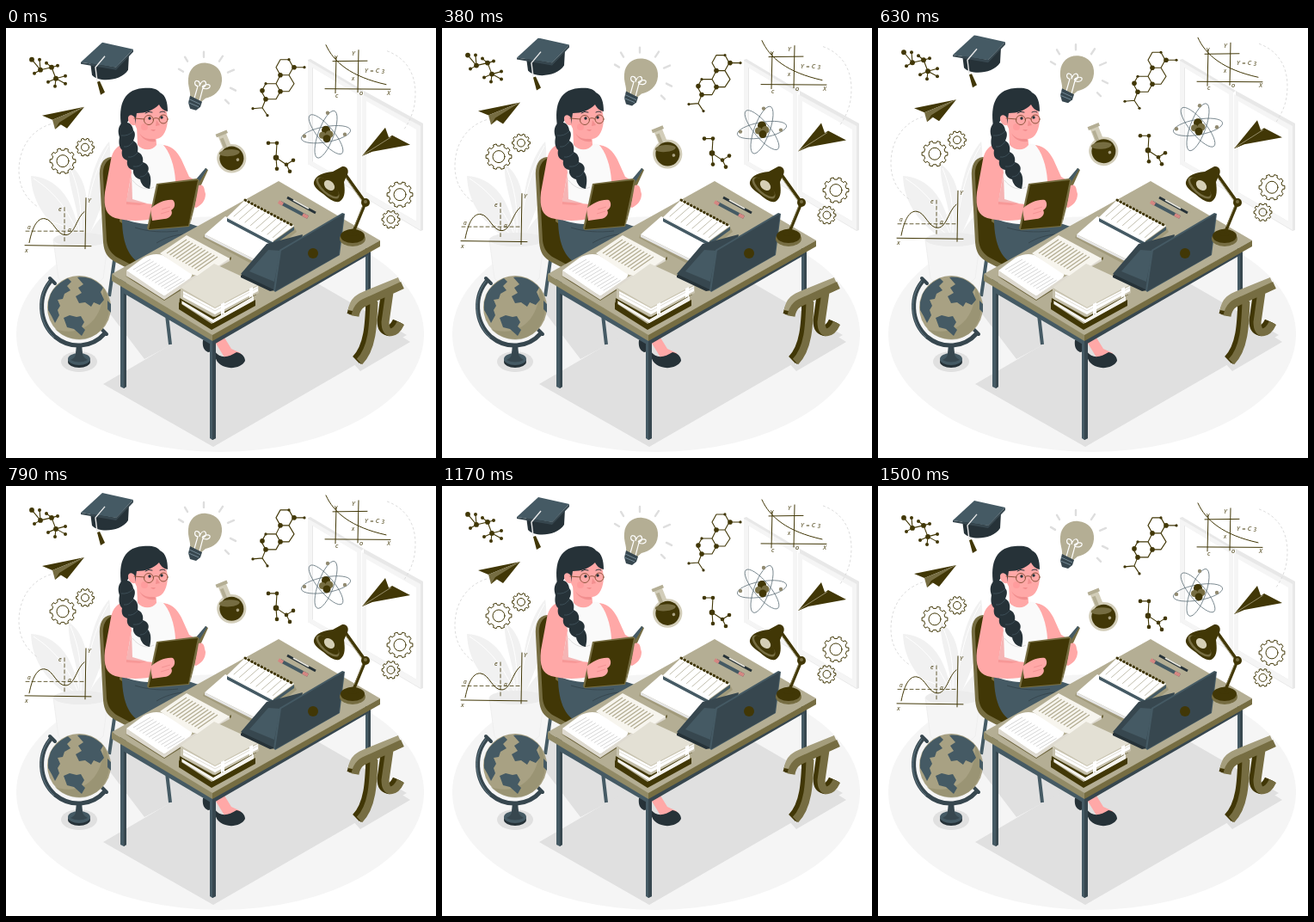
Animation of 500x500 px, one loop 1540 ms. Source, as an HTML page:

```html
<!DOCTYPE html>
<html lang="en">
<head>
<meta charset="utf-8">
<title>Studying at the desk</title>
<style>
html, body { margin: 0; width: 100%; height: 100%; overflow: hidden; background: #fff; }
svg { display: block; width: 100vw; height: 100vh; }
.float { animation: float 1540ms linear infinite; }
@keyframes float {
  0%, 100% { transform: translateY(-.3px); }
  47.1% { transform: translateY(-10px); }
  95.8% { transform: translateY(0); }
}
.ink { fill: none; stroke: #413706; stroke-linecap: round; stroke-linejoin: round; }
.dark { fill: #413706; }
.mid { fill: #766d42; }
.tan { fill: #b4ae94; }
.slate { fill: #455a64; }
.navy { fill: #37474f; }
.night { fill: #263238; }
.skin { fill: #ffa8a7; }
.blush { fill: #f28f8f; }
.pale { fill: #f5f5f5; }
.shade { fill: #e0e0e0; }
.white { fill: #fff; }
.dash { fill: none; stroke: #dcdcdc; stroke-dasharray: 3 2.5; }
text { font: italic 7.5px "Open Sans", Inter, sans-serif; fill: #413706; }
.small { font-size: 6.5px; }
</style>
</head>
<body>
<svg viewBox="0 0 500 500">
  <defs>
    <path id="pi-shape" d="M406 334C408 322 414 319 424 315L461 298M428 317C427 345 426 372 411 387M446 306L441 341C441 358 453 355 459 342"/>
  </defs>

  <ellipse class="pale" cx="249" cy="356" rx="237" ry="137"/>

  <g id="window">
    <path fill="#e8e8e8" fill-rule="evenodd" d="M351 37l3-1 62 37v120l-3 1-62-36zm6 9v110l54 31V78zM413 75l3-2 69 38v124l-3 1-69-41zm6 9v107l60 35V115z"/>
    <path fill="#f5f5f5" fill-rule="evenodd" d="M351 38l62 36v119l-62-35zm5 8v109l52 30V77zM414 77l68 37v121l-68-40zm5 8v106l58 34V118z"/>
  </g>

  <g id="plant">
    <path fill="#f1f1f1" d="M82 250C50 230 30 205 29 172c28 2 48 22 56 66 0-30-14-55-12-80 21 16 24 43 19 72 2-37 8-75 28-98 5 30-4 70-25 112 10-22 28-40 48-39-5 30-22 49-51 57z"/>
    <path fill="none" stroke="#fff" d="M32 175c25 16 40 36 53 67M75 163c10 24 13 45 12 75M119 137c-17 30-25 64-28 103M50 225c16 3 25 9 34 20"/>
    <path fill="#f5f5f5" stroke="#efefef" d="M55 246c18 10 46 10 64 0l-6 45c-10 12-42 12-52 0z"/>
    <ellipse cx="87" cy="246" rx="32" ry="8" fill="#ececec"/>
  </g>

  <g id="shadows" class="shade">
    <path d="M113 414l128 73 225-130-128-74z"/>
    <path d="M120 331v-36h70l50 48-51 27-28 15z"/>
    <path d="M402 388l46-37 22 14-58 34z"/>
    <ellipse cx="85" cy="388" rx="21" ry="12"/>
  </g>

  <g id="chair">
    <path fill="none" stroke="#455a64" stroke-width="4" d="M126 270l-6 42M186 325l5 43"/>
    <path class="mid" d="M122 150c-10 1-14 10-13 24l4 75c1 12 5 18 14 23l25 13 8-6-14-120z"/>
    <path class="dark" d="M124 151c-8 3-12 10-11 22l4 74c1 10 6 16 13 20l30 16 32-18-60-40 2-70z"/>
  </g>

  <g id="woman">
    <path class="skin" d="M240 360h14l8 13 11 5-4 8-15-3z"/>
    <path class="night" d="M229 363l10-1 5 13-9 2c-5-2-7-7-6-14zM243 376c6 9 16 7 25 1 6 1 10 5 10 10-3 7-15 10-23 7-8-2-13-9-12-18z"/>
    <path class="slate" d="M135 216l35 6 45 6 30 10-60 40-27-3c-15-7-24-25-23-59z"/>
    <path fill="none" stroke="#37474f" d="M150 232c16 5 32 6 50 4M175 250c10-6 20-9 31-10"/>
    <path class="skin" d="M180 136c12 0 19 7 24 17l9 20c9 5 18 13 19 20 0 8-5 13-11 16l-23-7-20-36z"/>
    <path fill="#fafafa" d="M139 136l14-3 29 2c8 8 14 25 15 42l-7 48c-14 5-37 4-52-3l-4-47z"/>
    <path fill="none" stroke="#dedede" d="M147 177c8 10 17 12 25 8M138 199c2 8 3 16 2 23"/>
    <path class="skin" d="M152 113l22 8 1 15c-5 7-16 7-22 0z"/>
    <path class="blush" d="M155 122c5 7 11 8 18 6l1 4c-9 1-16-3-19-10z"/>
    <path class="skin" d="M149 86l36 2 3 17c0 13-5 23-13 24-14 1-25-9-27-24z"/>
    <path class="night" d="M135 119c-5-25-1-47 24-49 9-1 17 0 20 5 7 3 9 12 9 22-5-1-8-4-10-8-7 7-16 10-26 10l-2 13-4-10z"/>
    <path class="skin" d="M142 105c0-5 6-5 8 0v8c-4 1-8-3-8-8z"/>
    <g class="ink" stroke-width="1">
      <circle cx="166" cy="107" r="5.5" stroke="#8c553e"/>
      <circle cx="183" cy="106" r="5" stroke="#8c553e"/>
      <path stroke="#8c553e" d="M171 106q3-3 7 0M161 106l-12-1"/>
      <path stroke="#263238" d="M162 99q4-3 8-1M179 98q4-2 6 0"/>
    </g>
    <path class="blush" d="M175 107l4 6-5 1zM168 118q4 4 6 0z"/>
    <circle class="night" cx="167" cy="105" r="1.7"/>
    <circle class="night" cx="181" cy="104" r="1.7"/>
    <circle cx="161" cy="115" r="4" fill="#ff8f92" opacity=".45"/>
    <path class="skin" d="M140 135c-10 0-16 7-18 18l-7 38c-2 18 2 27 12 30 15 4 32 4 47 0l17-4c7-3 9-9 6-16-8-3-17 1-25 4l-32-3 6-34z"/>
    <path class="blush" d="M140 201l6-31 1 29 17 5-9 2-15-1z" opacity=".65"/>
    <g class="night">
      <path d="M134 111c7-3 13 0 14 8 3 3 2 8 0 12 5 3 6 8 5 13 5 2 7 7 6 12 6 2 8 6 6 11 4 4 4 12 2 20-6-1-10-5-11-11-5-1-9-6-8-11-6-1-8-6-7-11-6-2-7-7-6-12-4-4-4-10-3-15-2-6-2-11 2-16z"/>
      <path fill="none" stroke="#455a64" stroke-width=".7" d="M134 125q8 1 14-5M137 138q6 1 11-6M142 150q6 1 11-5M148 161q7 1 11-4M156 173q6 0 9-6"/>
    </g>
    <path class="mid" d="M221 178l11-15 3 2-11 24-10 40z"/>
    <path class="slate" d="M220 177l12-14 2 1-11 18z"/>
    <path class="mid" d="M175 181l47-6 3 2-12 54-47 4-2-2z"/>
    <path class="dark" d="M177 182l46-5-11 53-46 4z"/>
    <path class="skin" d="M168 210c8-7 18-11 26-10 4 4 2 10-2 12 3 4-2 10-8 10l-14 2zM224 183c5-2 7 2 7 8l-3 10-8 5z"/>
    <path fill="none" stroke="#ef8f90" stroke-width=".8" d="M181 211l10-3M180 216l10-3"/>
  </g>

  <g id="desk">
    <path class="slate" d="M133 290h7v127l-3 2-4-2zM418 256h6v116l-3 2-3-2zM237 360h7v117l-4 2-3-2z"/>
    <path class="navy" d="M137 290h3v127l-3 2zM421 256h3v116l-3 2zM240 360h4v117l-4 2z"/>
    <path class="slate" d="M136 298l104 62v9l-104-61z"/>
    <path class="navy" d="M240 360l183-105v8l-183 106z"/>
    <path class="tan" d="M123 286l194-108 118 69-195 111z"/>
    <path fill="#918a66" d="M123 286l117 71v7l-117-70z"/>
    <path class="mid" d="M240 357l195-110v7l-195 110z"/>
  </g>

  <g id="papers">
    <path fill="#8f8865" opacity=".5" d="M229 244l60 32 49-39-3-6-47 35-56-28z"/>
    <path fill="#e5e5e5" d="M231 240l58 29 28-18v3l-28 18-58-29z"/>
    <path class="white" d="M231 240l24-21 62 32-28 18z"/>
    <path class="slate" d="M257 221l53 28 25-18v4l-25 18-53-28z"/>
    <path class="white" d="M257 220l22-21 56 31-25 18z"/>
    <path class="ink" id="notes" stroke-width=".6" opacity=".55"/>
    <path class="ink" stroke-width="3" stroke-dasharray=".8 3.5" stroke-linecap="butt" d="M278 200l56 30"/>
    <path fill="none" stroke="#263238" stroke-width="3" d="M327 197l33 18"/>
    <path fill="none" stroke="#e8e6dc" stroke-width="2" d="M334 200l18 10"/>
    <path fill="none" stroke="#455a64" stroke-width="4" d="M319 203l32 17"/>
    <path fill="none" stroke="#d58782" stroke-width="4" d="M317 202l5 3M345 217l6 3"/>
  </g>

  <g id="open-book">
    <path class="dark" d="M138 288l46 29 24-15 54-33v-3l-49 25-29 20z" opacity=".6"/>
    <path fill="#dedad0" d="M140 282l44 30 29-21 47-24v4l-47 26-29 19-44-28z"/>
    <path class="white" d="M140 282l20-15c8-4 15-5 22-3l32 19c3 2 3 5 0 8l-30 21z"/>
    <path fill="#f7f5ee" d="M179 262l31-21 50 27-27 18c-8 4-15 2-21-2z"/>
    <path id="left-page" fill="none" stroke="#c4c4c4" stroke-width=".7"/>
    <path id="right-page" fill="none" stroke="#b4ae94" stroke-width="1.4"/>
  </g>

  <g id="stack">
    <path class="dark" d="M201 319l38 25 51-28v7l-51 28-38-24z"/>
    <path fill="#f5f4ef" d="M205 315l36 22 47-26v6l-47 26-36-22z"/>
    <path class="dark" d="M202 314l39 22 50-29v3l-50 29-37-22v7l-3 2z"/>
    <path fill="#c7c2ae" d="M203 302l40 22 51-27v11l-51 28-40-22z"/>
    <path class="white" d="M206 306l37 20 50-26v6l-50 27-37-20z"/>
    <path fill="none" stroke="#d4d1c5" stroke-width=".7" d="M206 309l37 20 50-27"/>
    <path fill="#e3e0d4" d="M203 302l39-28 52 24-51 27z"/>
    <path class="white" d="M250 321l4-2v14l-2-1-2 3zM283 303l4-2v12l-2-1-2 2z"/>
  </g>

  <g id="laptop">
    <path class="night" d="M273 288l30-36 42-11-32 64-6 1-34-16z"/>
    <path class="navy" d="M273 286l30-35 42-11-34 64z"/>
    <path class="slate" d="M283 283l22-25 14 1-7 36z"/>
    <path class="slate" d="M318 258l73-43 3 1-6 48-75 43-2-2z"/>
    <path class="navy" d="M320 259l73-43-6 48-74 42z"/>
    <circle class="dark" cx="357" cy="262" r="6"/>
  </g>

  <g id="lamp">
    <ellipse class="mid" cx="403" cy="245" rx="15" ry="9"/>
    <ellipse class="dark" cx="403" cy="242" rx="14" ry="8"/>
    <path class="dark" d="M396 240v-4q7-5 14 0v4q-7 4-14 0z"/>
    <path class="ink" stroke-width="3.5" d="M404 237l14-34-25-35"/>
    <path fill="none" stroke="#8f8865" stroke-width=".8" d="M405 231l11-27-22-31"/>
    <circle class="dark" cx="418" cy="203" r="5"/>
    <circle class="mid" cx="418" cy="202" r="2"/>
    <path class="dark" d="M358 179c2-8 11-11 22-12l11-6c6-1 8 5 6 9l-4 9c1 9 2 17-4 22-5 4-13-2-20-8-7-5-12-9-11-14z"/>
    <ellipse class="mid" cx="374" cy="186" rx="17" ry="7" transform="rotate(42 374 186)"/>
    <ellipse class="dark" cx="375" cy="185" rx="15" ry="6" transform="rotate(42 375 185)"/>
    <ellipse fill="#d5cfb6" cx="376" cy="183" rx="7" ry="5" transform="rotate(42 376 183)"/>
  </g>

  <g id="globe">
    <ellipse class="night" cx="85" cy="388" rx="13" ry="7"/>
    <ellipse class="slate" cx="85" cy="385" rx="13" ry="7"/>
    <path class="navy" d="M82 368h6l1 10c0 4 3 6 6 8q-10 5-20 0c4-2 6-4 6-8z"/>
    <path fill="none" stroke="#37474f" stroke-width="5" d="M54 292C36 311 38 342 57 359c18 15 43 13 58-4"/>
    <path fill="none" stroke="#607985" stroke-width="1" d="M53 292C35 311 37 342 56 360"/>
    <path fill="none" stroke="#37474f" stroke-width="4" stroke-linecap="round" d="M51 291l6 6M111 350l6 6"/>
    <circle cx="85" cy="325" r="37" fill="#a8a183"/>
    <path fill="#918a69" d="M113 301c15 25 5 54-21 61-15 2-28-4-35-12 32 11 58-12 56-49z" opacity=".55"/>
    <g class="slate">
      <path d="M52 309c5-9 12-14 20-18l4 4-5 5 4 5-7 4-2 6-6 1 3 7-3 5 2 6-5 9-4-8-4-7v-9z"/>
      <path d="M83 290c12-2 23 4 30 12l-3 5 4 9-5 6-7-3-3 5-7-5-7 1-4-8 7-4-4-6 6-4z"/>
      <path d="M67 337l7-3 8 2 5-1 4 7-3 5 4 4-4 7-9-8-8-2z"/>
      <path d="M118 317l4 4v10l-4-4z"/>
    </g>
  </g>

  <g id="pi" fill="none" stroke-width="11" stroke-linejoin="round">
    <use href="#pi-shape" stroke="#413706" transform="translate(-4 -1)"/>
    <use href="#pi-shape" stroke="#413706" transform="translate(-2 0)"/>
    <path stroke="#a49d7c" d="M403 329C405 317 411 314 421 310L458 295"/>
    <use href="#pi-shape" stroke="#766d42" stroke-width="9" transform="translate(0 1)"/>
  </g>

  <g class="float">
    <path class="dash" d="M52 112C27 120 15 142 15 166c0 19 8 33 23 43"/>
    <path class="dash" d="M443 27c22 8 33 26 33 49 0 18-5 30-13 42"/>

    <g id="molecules" class="ink" stroke-width="1.1"></g>

    <g id="cap">
      <path class="night" d="M98 40l2 15c8 9 34 7 42-6l1-18-15 15z"/>
      <path class="slate" d="M112 17l36 8-20 21-41-6z"/>
      <path class="navy" d="M87 40l41 6 20-21v3l-20 21-41-7z"/>
      <path fill="none" stroke="#e8e8e8" stroke-width="1.4" d="M115 33l-11 13 2 16"/>
      <path class="dark" d="M106 63l3-1 6 13-5 3z"/>
    </g>

    <g id="bulb">
      <path fill="none" stroke="#dedede" stroke-width="2.4" stroke-linecap="round" d="M208 34l3 5M230 28v6M252 33l-4 6M265 49l-7 3M267 73l-6-3M259 88l-4-4M201 48l5 3"/>
      <path class="tan" d="M212 59c1-12 10-19 21-18 12 1 19 10 18 21-1 12-10 18-19 20l-6 5-12-6c1-8-3-13-2-22z"/>
      <path fill="none" stroke="#fff" stroke-width="1.2" d="M219 82l4-14c-5-1-4-8 0-6 3 1 2 6 2 6s2-7 6-6c3 2 1 7-2 7s5-5 8-2c1 4-5 5-8 3l-4 15"/>
      <path class="navy" d="M214 79l14 7-2 6-5 4-7-2-2-7z"/>
      <path fill="none" stroke="#738995" d="M213 83l13 6M212 87l12 5"/>
    </g>

    <g id="flask" transform="rotate(-22 262 151)">
      <path fill="#d2cdb9" d="M257 121h10v15c8 3 12 8 12 16a17 17 0 0 1-34 0c0-8 4-13 12-16z"/>
      <path class="tan" d="M255 119h14v4h-14zM258 126h4v15h-4z"/>
      <circle class="dark" cx="262" cy="152" r="14"/>
      <ellipse class="mid" cx="262" cy="145" rx="12" ry="4" transform="rotate(18 262 145)"/>
      <circle cx="268" cy="156" r="1.8" fill="#aaa283"/>
    </g>

    <g id="atom" fill="none" stroke="#66777f" stroke-width=".8">
      <ellipse cx="372" cy="124" rx="29" ry="9" transform="rotate(-10 372 124)"/>
      <ellipse cx="372" cy="124" rx="29" ry="9" transform="rotate(50 372 124)"/>
      <ellipse cx="372" cy="124" rx="29" ry="9" transform="rotate(110 372 124)"/>
      <g stroke="none">
        <circle class="dark" cx="372" cy="119" r="5"/>
        <circle class="mid" cx="368" cy="125" r="4"/>
        <circle class="mid" cx="376" cy="124" r="4.5"/>
        <circle class="dark" cx="373" cy="129" r="4.5"/>
        <circle fill="#918a70" cx="374" cy="99" r="2.2"/>
        <circle fill="#918a70" cx="394" cy="124" r="2.2"/>
        <circle fill="#918a70" cx="347" cy="126" r="2.2"/>
      </g>
    </g>

    <g id="planes">
      <path class="dark" d="M42 102l49-10-37 15z"/>
      <path class="mid" d="M54 107l37-15-34 26z"/>
      <path class="dark" d="M57 118l5-8 29-18-20 25-8-5z"/>
      <path class="dark" d="M414 149l27-33 5 14z"/>
      <path class="mid" d="M414 149l32-19 4 6-23 7z"/>
      <path class="dark" d="M414 149l35-24 21 11-44 8z"/>
      <path fill="none" stroke="#aaa283" stroke-width=".8" d="M415 148l33-21"/>
    </g>

    <g id="gears" class="ink" stroke-width="1"></g>

    <g id="curve" class="ink" stroke-width="1">
      <path d="M372 20c9 20 29 37 70 46M371 71l76 .5M410 26l-1 49M384 34l-1 42M380 39l40-.5"/>
    </g>
    <text x="402" y="32">Y</text>
    <text x="382" y="36">v</text>
    <text class="small" x="402" y="61">x</text>
    <text x="417" y="52" textLength="23">Y=C<tspan class="small" dy="1">3</tspan></text>
    <text x="383" y="81">c</text>
    <text x="411" y="78">o</text>
    <text x="443" y="78">X</text>

    <g id="wave" class="ink" stroke-width="1">
      <path d="M27 250c4-20 10-29 18-28 10 1 14 20 25 19 10-1 12-20 21-27M22 253l77 1M93 198l-1 59"/>
      <path stroke-width=".8" stroke-dasharray="4 3" d="M23 236.500h69M68 209v41"/>
    </g>
    <text x="95" y="203">Y</text>
    <text x="61" y="213">e</text>
    <text class="small" x="25" y="234">a</text>
    <text class="small" x="72" y="237">a</text>
    <text x="22" y="261">x</text>
  </g>
</svg>
<script>
const byId = id => document.getElementById(id);

// Draws n parallel strokes, each offset by (dx, dy) from the last.
function rule(id, x, y, w, h, dx, dy, n) {
  let d = "";
  for (let i = 0; i < n; i++) d += `M${x + i * dx} ${y + i * dy}l${w} ${h}`;
  byId(id).setAttribute("d", d);
}
rule("notes", 265, 219, 16, -14, 6.500, 3.500, 8);
rule("left-page", 148, 281, 20, -12, 3.6, 2.2, 12);
rule("right-page", 187, 262, 23, -16, 3.6, 2, 11);

function gear(x, y, r, hole, teeth = 10) {
  const step = 2 * Math.PI / teeth, pts = [];
  for (let i = 0; i < teeth; i++) {
    for (const [k, size] of [[-.27, .84], [-.2, 1], [.2, 1], [.27, .84]]) {
      const a = (i + k) * step;
      pts.push((x + size * r * Math.cos(a)).toFixed(1) + "," + (y + size * r * Math.sin(a)).toFixed(1));
    }
  }
  return `<polygon points="${pts.join(" ")}"/><circle cx="${x}" cy="${y}" r="${hole}"/>`;
}
byId("gears").innerHTML = gear(66, 155, 15, 7) + gear(92, 139, 10.5, 4.5)
  + gear(458, 194, 15, 7) + gear(447.500, 223, 10.5, 4.5);

const dots = (r, ...pts) => pts.map(([x, y]) =>
  `<circle class="dark" style="stroke:none" cx="${x}" cy="${y}" r="${r}"/>`).join("");
const bonds = d => `<path d="${d}"/>`;
byId("molecules").innerHTML =
  bonds("M30 37l10 12 13-3 5 13 11-3M39 37l1 12-7 4M47 41l6 5 7-2M49 63l9-4-1 9M58 59l11 6") +
  dots(2.9, [30, 37], [40, 49], [53, 46], [58, 59]) +
  dots(2, [39, 37], [33, 53], [47, 41], [60, 44], [49, 63], [57, 68], [69, 56], [69, 65]) +
  bonds("M314 46l5-9h10l5 9-5 9h-10zM319 55l-5 10 5 9h10l6-9-6-10M314 65h-12l-5 9 5 9h12l5-9M334 46h13M302 83l-4 10-11 1M298 93l6 9") +
  dots(2.8, [335, 46], [319, 55], [319, 74], [302, 83], [298, 73]) +
  dots(1.6, [347, 46], [287, 94], [304, 102], [329, 37], [302, 65]) +
  bonds("M305 134h10l-1 17 12 8 8-5M326 159l4 8M314 151l1 13") +
  dots(3.3, [314, 151]) + dots(2.3, [305, 134], [315, 134], [326, 159], [334, 154], [330, 167], [315, 164]);
</script>
</body>
</html>
```
